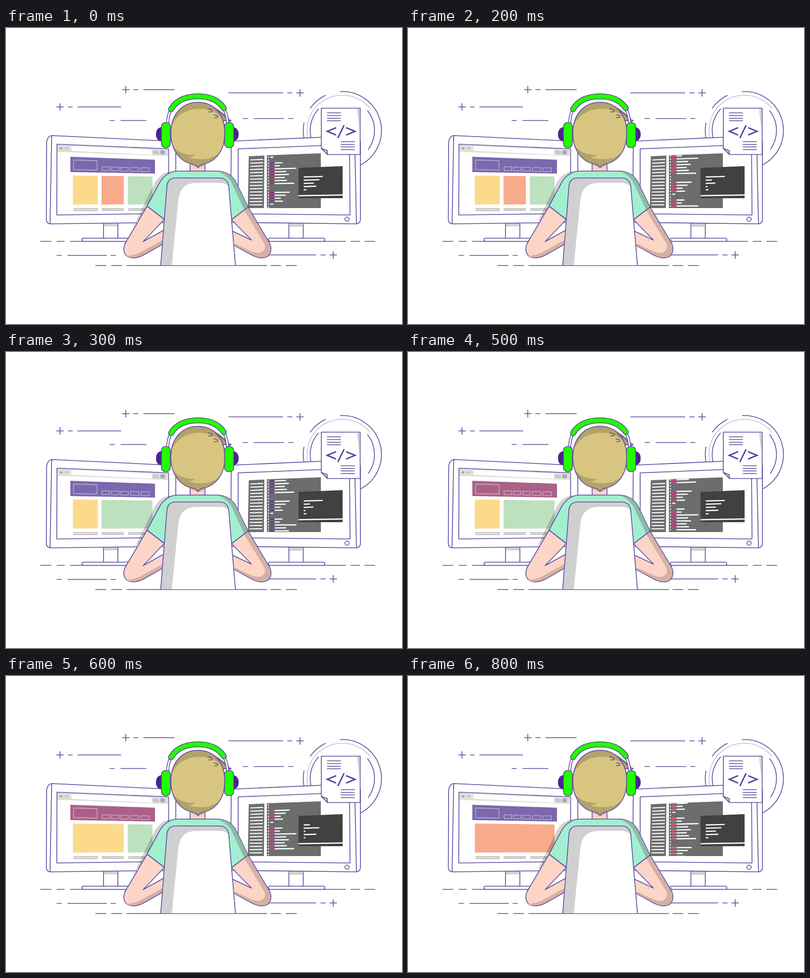
Animation, 800 px wide and 600 px high, one loop 900 ms. Source, as an HTML page:

```html
<!DOCTYPE html>
<html lang="en">
<head>
<meta charset="utf-8">
<title>Developer at work</title>
<style>
  html, body { margin: 0; width: 100%; height: 100%; overflow: hidden; background: #fff; }
  svg { display: block; width: 100%; height: 100%; }
  .ink { fill: none; stroke: #5a4b9f; stroke-width: 1.6; stroke-linejoin: round; stroke-linecap: round; }
  .white { fill: #fff; }
  .skin { fill: #fcd5c7; }
  .mint { fill: #a2efd0; }
  .green { fill: #22fb00; }
  .grey { fill: #d0d0d0; }
  .shade { fill: #000; fill-opacity: .18; }
  .symbol { stroke: #4f3f9a; stroke-width: 2.8; stroke-linejoin: miter; stroke-linecap: butt; }
  .dots { stroke-width: 1.3; stroke-dasharray: .1 2.6; }
</style>
</head>
<body>
<svg viewBox="0 0 800 600">
  <defs>
    <clipPath id="panel"><path d="M527 258L636 254V365H527Z"/></clipPath>
    <path id="headShape" d="M388 150.500C421 150.500 442 176 442 213C442 247 425 271 398 276C394 277 391 279 388 283C385 279 382 277 377 276C351 271 333 247 333 213C333 176 355 150.500 388 150.500Z"/>
    <clipPath id="head"><use href="#headShape"/></clipPath>
    <path id="wires" d="M332 167Q327 179 326.500 194M442 167Q447 179 448 194"/>
    <path id="band" d="M333.500 164.500C344 146 365 138.500 388 138.500C411 138.500 429 146 440 162.500"/>
  </defs>

  <g id="dashes" class="ink"></g>
  <g id="rings" class="ink"></g>

  <!-- Left monitor -->
  <g class="ink">
    <path class="white" d="M197 394V427H226V394Z"/>
    <path class="grey" stroke="none" d="M198 396H225V402H198Z"/>
    <rect class="white" x="153.500" y="426" width="110" height="6.500" rx="3.200"/>
    <path class="white" d="M93 218L343 230V394L89 397Q81 396 81.500 387L82 234Q83 219 93 218Z"/>
    <path d="M93 218Q92 222 92 232L89 397"/>
    <path d="M103 235.500L328.500 245V376L102.500 379Z"/>
  </g>
  <path fill="#dedede" d="M104 237L328 246.500V259.500L104 251Z"/>
  <path fill="#fff" d="M132 239.500L295 246.500V257L132 249Z"/>
  <path fill="#c9c9c9" d="M297 248.500L309 249V256L297 255.500Z"/>
  <path fill="#a9a9a9" d="M312 248L321 248.500V256L312 255.500Z"/>
  <circle cx="111" cy="244" r="2.300" fill="#f27870"/>
  <circle cx="117" cy="244" r="2.300" fill="#f8d27e"/>
  <circle cx="123" cy="244" r="2.300" fill="#b4cf8e"/>
  <path id="banner" d="M130 261L301 267V295L130 292Z"/>
  <g id="nav" fill="none" stroke="#fff" stroke-opacity=".5" stroke-width="1.300"></g>
  <g id="cards"></g>
  <path fill="none" stroke="#a2a2a2" stroke-width="1.700" d="M136 366.500H186M193 366.500H238M247 366.500H290M136 370H186M193 369.500H238M247 369.500H290"/>

  <!-- Right monitor -->
  <g class="ink">
    <path class="white" d="M571.500 394V427H600.500V394Z"/>
    <path class="grey" stroke="none" d="M572.500 396H600V403H572.500Z"/>
    <rect class="white" x="530" y="426" width="114" height="6.500" rx="3.200"/>
    <path class="white" d="M455 229.500L704 218.500Q715 220 716 232V388Q716 396 708 397L454 394Z"/>
    <path d="M704 218L705 256L708 397"/>
    <path d="M469 245L694 236L695 379L469 376.500Z"/>
    <circle cx="689" cy="387.500" r="4.300"/>
  </g>
  <path fill="#6c6d6d" d="M490.500 260L522 258.500L521 365H488.500ZM527 258L636 254V365H527Z"/>
  <g id="sidebar" stroke="#fff" stroke-width="2.200"></g>
  <g clip-path="url(#panel)" id="code"></g>
  <path fill="#414142" d="M591 283.500L680 280V345H591Z"/>
  <path stroke="#fff" stroke-width="2.500" d="M591 340L680 338.500"/>
  <g id="terminal" stroke="#fff" stroke-width="2.300"></g>

  <!-- Document -->
  <g class="ink">
    <path class="white" d="M637 162.500H715.500V256.500H649.500L637 244Z"/>
    <path class="grey" stroke="none" d="M709 163.500H714.700V212Z"/>
    <path class="grey" d="M637 244L649 248.500L649.500 256.500Z"/>
    <path d="M649 172H676M649 177.500H676M649 183H676M649 188H676M677 230.500H704M677 236H704M677 241H704M677 246.500H704"/>
    <path class="symbol" d="M667 202L649 209.500L667 217M683 197L670.500 223M687 202L705 209.500L687 217"/>
  </g>

  <!-- Person -->
  <path class="shade" d="M345 290C322 289 310 298 301 313L262 392L270 388L318 304Z"/>
  <g class="ink">
    <path class="skin" d="M285 361L240 438C235 452 240 466 256 466Q268 466 280 459L322 435V408L277 433L320 388Z"/>
    <path class="skin" d="M489 363L533 437C539 452 533 466 517 466Q508 466 498 461L456 438V411L496 430L455 388Z"/>
  </g>
  <path fill="#d4b1a4" d="M243 462Q257 461 269 456L318 429V436L280 458Q255 470 243 462ZM488 364L532 437C538 452 532 465 517 465Q508 465 498 460L462 441V437L492 451Q511 460 519 452Q527 446 520 434L481 369Z"/>
  <g class="ink">
    <path class="skin" d="M372 272H402V292H372Z"/>
    <path stroke="none" style="fill:#d4b1a4" d="M373 273H401V279L388 284L373 277Z"/>
    <path class="mint" d="M285 361L310 314Q323 291 347 290H425Q451 290 464 311L489 363L455 389L440 330H330L320 388Z"/>
  </g>
  <path fill="#8fb9a8" d="M428 291Q451 291 463.500 311L488 362.500L481 368L459 321Q449 298 428 291Z"/>

  <g clip-path="url(#head)">
    <path fill="#b2a26c" d="M325 145H450V290H325Z"/>
    <path fill="#d8c680" d="M333 205C340 177 366 162 397 164C420 165 436 178 445 193V228C438 252 419 267 394 266Q379 266 368 262Q377 262 383 257C360 259 338 248 333 230Z"/>
  </g>
  <path fill="#b2a26c" d="M417 158Q437 168 454 187L440 189Q432 174 417 165Z"/>
  <g class="ink">
    <use href="#headShape"/>
    <path d="M408 164Q417 165 416.500 170L409 170M420 176Q429 177 428 181L421 182M424 165Q440 174 448 187M438 188L455 187L447 193"/>
  </g>

  <g fill="none" stroke-linecap="round">
    <use href="#wires" stroke="#5a4b9f" stroke-width="6"/>
    <use href="#wires" stroke="#fff" stroke-width="3"/>
    <use href="#band" stroke="#5a4b9f" stroke-width="12"/>
    <use href="#band" stroke="#22fb00" stroke-width="8.800"/>
  </g>
  <path fill="#4d2193" d="M316 200.500Q303 202 303 215.500T316 230ZM457 200.500Q470 202 470 215.500T457 230Z"/>
  <g class="ink">
    <rect class="green" x="314" y="191.500" width="18" height="51" rx="8"/>
    <rect class="green" x="441.500" y="191.500" width="18.500" height="51" rx="8"/>
  </g>

  <!-- Chair -->
  <path class="white" d="M312.500 481L325 322Q326 304 343 304H431Q448 304 450 321L463.500 481Z"/>
  <path class="grey" d="M312.500 481L325 322Q326 304 343 304H431Q448 304 450 322Q445 314 433 314H385Q351 314 348 350L335 481Z"/>
  <path class="ink" d="M312.500 481L325 322Q326 304 343 304H431Q448 304 450 321L463.500 481"/>
</svg>

<script>
const byId = id => document.getElementById(id);
const line = (x1, y1, x2, y2 = y1, extra = '') =>
  `<line x1="${x1}" y1="${y1}" x2="${x2}" y2="${y2}" ${extra}/>`;

// Background strokes: [y, from, to, from, to, ...]
const dashRows = [
  [125, 258, 267, 278, 340], [160, 126, 134, 145, 232], [187.5, 210, 219, 232, 283],
  [131.5, 450, 559, 569, 578], [183.5, 479, 488, 501, 561, 571, 580],
  [432.5, 70, 91, 103, 118, 130, 686, 697, 714, 725, 745],
  [461, 103, 112, 125, 203, 212, 221], [460, 530, 626, 636, 645],
  [481.5, 181, 202, 213, 234, 244, 527, 535, 555, 566, 587]
];
const plus = (x, y) => line(x - 7, y, x + 7) + line(x, y - 7, x, y + 7);
byId('dashes').innerHTML =
  dashRows.map(([y, ...xs]) =>
    xs.map((x, i) => i % 2 ? line(xs[i - 1], y, x) : '').join('')).join('') +
  plus(242, 125) + plus(109, 160) + plus(594, 131.5) + plus(661, 460);

function arc(radius, from, to, className = '') {
  const point = deg => {
    const a = deg * Math.PI / 180;
    return `${679.5 + radius * Math.cos(a)} ${207.7 + radius * Math.sin(a)}`;
  };
  return `<path class="${className}" d="M${point(from)}A${radius} ${radius} 0 ${+(to - from > 180)} 1 ${point(to)}"/>`;
}
byId('rings').innerHTML =
  arc(79, -93, 63) + arc(79, 170, 191) + arc(79, 215, 244) +
  arc(65, -38, 36) + arc(65, 160, 222) + arc(71.5, 160, 322, 'dots');

byId('nav').innerHTML =
  '<path d="M136.500 267.500L184 269V288L136.500 287Z"/>' +
  [[194, 15], [213, 15], [232, 15], [251.5, 16.5], [272.5, 17]].map(([x, w], i) =>
    `<rect x="${x}" y="${281.5 + i * .5}" width="${w}" height="7.500"/>`).join('');

byId('sidebar').innerHTML = Array.from({ length: 15 }, (_, i) => {
  const y = 267.5 + i * 6.5, left = 493.5 - i * .13;
  return line(left, y, left + 26, y - 1.2 * (1 - i / 15));
}).join('');

// Right end of each code row; 0 is an empty row, SHORT has no keyword
const SHORT = 540;
const codeRows = [573, 565, 555, 559.5, SHORT, 0, 558.5, 553, 586.5, 566, 571.5, 563, 567.5, 582, 0, 0];
const ROW = 5.95;

function drawCode(step, keyword) {
  const start = 333.3 - step * 10.07;
  let out = '';
  for (let i = -16; i < 32; i++) {
    const y = start + i * ROW;
    if (y < 252 || y > 368) continue;
    const end = codeRows[(i + 32) % 16];
    const yAt = x => y - (x - 536) * .037 * (365 - y) / 110;
    const bar = (a, b, color) => line(a, yAt(a), b, yAt(b), `stroke="${color}" stroke-width="2.400"`);
    out += bar(529, 531.2, '#fff');
    if (end === SHORT) out += bar(534, end, '#fff');
    else if (end) out += bar(533, 542, keyword) + bar(542.5, end, '#fff');
  }
  byId('code').innerHTML = out;
}

const cardColors = { y: '#fcda8c', o: '#f8ab8b', g: '#bde0be' };
const cardSlots = [[135, 185.5], [193, 238], [246, 296]];

// One letter per slot; repeated letters merge into one wide card
function drawCards(layout) {
  let out = '';
  for (const key of new Set(layout)) {
    const left = cardSlots[layout.indexOf(key)][0];
    const right = cardSlots[layout.lastIndexOf(key)][1];
    const top = x => 299 + (x - 135) * .012;
    out += `<path fill="${cardColors[key]}" d="M${left} ${top(left)}L${right} ${top(right)}V357.500L${left} 358Z"/>`;
  }
  byId('cards').innerHTML = out;
}

const VIOLET = '#7b68ad', PLUM = '#aa6189';
const LONG = [640, 633, 622, 627, 607], BRIEF = [640, 614, 621, 605, 607], MIXED = [614, 633, 605, 627, 605];
const steps = [
  ['yog', VIOLET, '#a8168f', LONG],
  ['yog', VIOLET, '#d02a88', LONG],
  ['yog', VIOLET, '#f03c84', BRIEF],
  ['ygg', VIOLET, '#662d91', BRIEF],
  ['ygg', PLUM, '#e22b80', LONG],
  ['ygg', PLUM, '#dc308e', LONG],
  ['yyg', PLUM, '#da369c', MIXED],
  ['yyg', PLUM, '#e64c8a', MIXED],
  ['ooo', VIOLET, '#f2627c', LONG]
];

let shown = -1;
function tick() {
  const step = Math.floor(performance.now() % 900 / 100);
  if (step !== shown) {
    shown = step;
    const [layout, banner, keyword, ends] = steps[step];
    drawCards(layout);
    byId('banner').setAttribute('fill', banner);
    drawCode(step, keyword);
    byId('terminal').innerHTML = ends.map((x, i) => {
      const y = 302 + i * 6.5;
      return line(601.5, y, x, y - (x - 601.5) * .03);
    }).join('');
  }
  requestAnimationFrame(tick);
}
tick();
</script>
</body>
</html>
```
